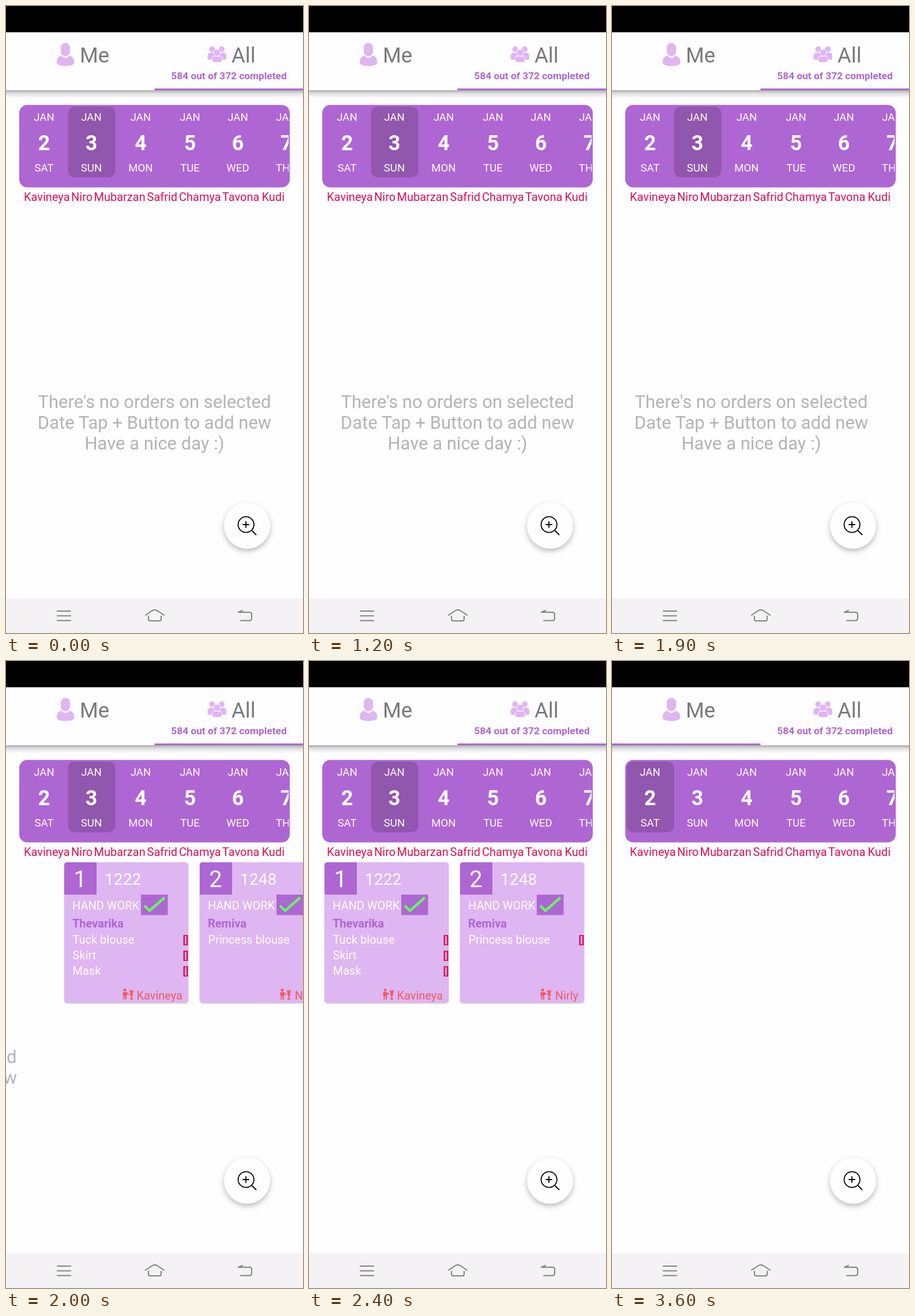
Write an HTML page that moves like this. It is 515 px wide and 1087 px high and loops after 5200 ms.

```html
<!DOCTYPE html>
<html lang="en">
<head>
<meta charset="utf-8">
<title>Order list</title>
<style>
  html, body { margin: 0; height: 100%; overflow: hidden; background: #fefdff; }
  svg { display: block; width: 100vw; height: 100vh; font-family: Roboto, sans-serif; font-size: 20px; }
  .mid { text-anchor: middle; }
  .end { text-anchor: end; }
  .bold { font-weight: 700; }
  .white { fill: #fffdff; }
  .purple { fill: #ae66d3; }
  .lilac { fill: #deb6f2; }
  .red { fill: #dc0f54; }
  .coral { fill: #f25a62; }
  .title { font-size: 36.5px; fill: #7a787c; }
  .day { font-size: 18.6px; }
  .line { fill: none; stroke-linecap: round; stroke-linejoin: round; }
  .card { filter: drop-shadow(0 1px 1px #0004); }
  .fab { filter: drop-shadow(0 4px 5px #0004); }
</style>
</head>
<body>
<svg viewBox="0 0 515 1087" preserveAspectRatio="none">
  <defs>
    <linearGradient id="shade" x2="0" y2="1">
      <stop offset="0" stop-color="#000" stop-opacity=".32"/>
      <stop offset=".4" stop-color="#000" stop-opacity=".12"/>
      <stop offset="1" stop-color="#000" stop-opacity="0"/>
    </linearGradient>
    <clipPath id="stripClip"><rect x="25" y="171" width="465" height="144"/></clipPath>
  </defs>
  <rect width="515" height="1087" fill="#fefdff"/>

  <g id="pager"></g>

  <rect width="515" height="45.5"/>
  <rect y="146" width="515" height="14" fill="url(#shade)"/>
  <g class="lilac">
    <path d="M88 97Q88 88 96 86Q103 94 110 86Q118 88 118.5 97Q119 104 103 104Q87 104 88 97Z"/>
    <rect x="94.5" y="63.5" width="17" height="24" rx="8.5" stroke="#fefdff"/>
    <circle cx="357.5" cy="75" r="5"/>
    <circle cx="374" cy="75" r="5"/>
    <path d="M349.5 92V86Q350 81 356 81H376Q382 81 382 86V92Q380 94 375 93H357Q352 94 349.5 92Z"/>
    <g stroke="#fefdff">
      <path d="M357 95Q357 87 362 87H370Q375 87 375 95Q373 98 366 98Q359 98 357 95Z"/>
      <circle cx="366" cy="81" r="6"/>
    </g>
  </g>
  <text class="title" x="128" y="98">Me</text>
  <text class="title" x="391" y="98">All</text>
  <text class="mid bold purple" x="386.5" y="127" font-size="17.3">584 out of 372 completed</text>
  <rect id="indicator" class="purple" y="143" width="257.5" height="3"/>

  <rect class="purple" x="23" y="171.5" width="469" height="143" rx="14"/>
  <rect id="selected" y="174.5" width="82" height="122.5" rx="12" fill="#9156ad"/>
  <g id="days" class="mid white" clip-path="url(#stripClip)"></g>
  <g id="staff" class="red"></g>

  <circle class="fab" cx="418" cy="901" r="40" fill="#fefdff"/>
  <path class="line" stroke="#000" stroke-width="1.8"
    d="M402.5 899a13.7 13.7 0 1 0 27.4 0a13.7 13.7 0 1 0-27.4 0M416 894v10M411 899h10M426 909l7.5 7.5"/>

  <rect y="1027" width="515" height="60" fill="#f4f2f5"/>
  <path class="line" stroke="#828183" stroke-width="2"
    d="M89 1049h23M89 1057.3h23M89 1065.5h23
       M242 1056L254 1048Q258 1046 262 1048L274 1056M247 1058v5q0 3 3 3h16q3 0 3-3v-5
       M403 1051h19q4 0 4 4v6.5q0 4-4 4h-15M403 1051l7-3"/>
</svg>
<script>
const $ = id => document.getElementById(id);
const WIDTH = 515, LOOP = 5200, STEP = 100;

const text = (x, y, label, cls = '', size = 20) =>
  `<text x="${x}" y="${y}" class="${cls}" style="font-size:${size}px">${label}</text>`;

const emptyPage = x => `<g transform="translate(${x})" fill="#b5b3b6">` +
  ["There's no orders on selected", 'Date Tap + Button to add new', 'Have a nice day :)']
    .map((line, i) => text(257.5, 697 + 36 * i, line, 'mid', 31)).join('') + '</g>';

const tailorIcon = x => `<g class="coral" transform="translate(${x} 568)">
  <circle cx="4" cy="2.5" r="2.5"/>
  <path d="M1 6H7L11 9V11L7 10V19H5V13H3.5V19H1.5V12L0 11Z"/>
  <path d="M13 2L15 4L17 2L19 4L17.5 9L18.5 12H16.5V17H18V19H13V17H14.5V12H12.5L13.5 9L12 4Z"/></g>`;

const card = (x, number, order, client, items, tailor, iconX) => `<g transform="translate(${x})">
  <rect class="lilac card" y="349" width="215" height="243.5" rx="5"/>
  <path class="purple" d="M0 405V354Q0 349 5 349H56V405Z"/>
  ${text(27.5, 392, number, 'mid white', 40)}
  ${text(70, 388, order, 'white', 28.2)}
  ${text(14, 431, 'HAND WORK', 'white')}
  <rect class="purple" x="133" y="405" width="46.5" height="35.5"/>
  <path d="M139 424L148 433L174 410" fill="none" stroke="#66f564" stroke-width="4.5"/>
  ${text(14, 462, client, 'bold purple')}
  ${items.map((item, i) => text(14.5, 489.5 + 27.2 * i, item, 'white') +
    text(215.5, 489.5 + 27.2 * i, '[]', 'end red bold', 18)).join('')}
  ${tailorIcon(iconX)}
  ${text(205, 586.5, tailor, 'end coral')}</g>`;

$('pager').innerHTML = emptyPage(0) + emptyPage(WIDTH) +
  `<g transform="translate(${2 * WIDTH})">` +
  card(27, 1, 1222, 'Thevarika', ['Tuck blouse', 'Skirt', 'Mask'], 'Kavineya', 101) +
  card(262, 2, 1248, 'Remiva', ['Princess blouse'], 'Nirly', 139) + '</g>';

$('days').innerHTML = ['SAT', 'SUN', 'MON', 'TUE', 'WED', 'THU'].map((day, i) => {
  const x = [66, 148, 233.5, 319, 402, 486][i];
  return text(x, 199, 'JAN', 'day', 18.6) + text(x, 250, i + 2, 'bold', 36) + text(x, 287, day, 'day', 18.6);
}).join('');

$('staff').innerHTML = Object.entries({
  Kavineya: 31, Niro: 113, Mubarzan: 152.5, Safrid: 244.5, Chamya: 300, Tavona: 375, Kudi: 443.5
}).map(([name, x]) => text(x, 338, name)).join('');

// A short finger drag, then a fling that decays towards the next page.
const swipe = (t, start) => {
  const n = (t - start) / STEP;
  return n < 1 ? 0 : Math.round(WIDTH - 499 * 0.148 ** (n - 1));
};

function draw() {
  const t = Math.floor(performance.now() % LOOP / STEP) * STEP;
  const toMe = t < 3500 ? 0 : t < 3600 ? 0.85 : 1;
  const offset = swipe(t, 1200) + swipe(t, 1800) - WIDTH * toMe;
  $('pager').setAttribute('transform', `translate(${-offset})`);
  $('pager').setAttribute('visibility', toMe === 1 ? 'hidden' : 'visible');
  // Earlier pages belong to the All tab only.
  for (const page of [...$('pager').children].slice(0, 2))
    page.style.display = toMe ? 'none' : '';
  $('indicator').setAttribute('x', 257.5 * (1 - toMe));
  $('selected').setAttribute('x', toMe ? 25.7 : 107.5);
  requestAnimationFrame(draw);
}
draw();
</script>
</body>
</html>
```
